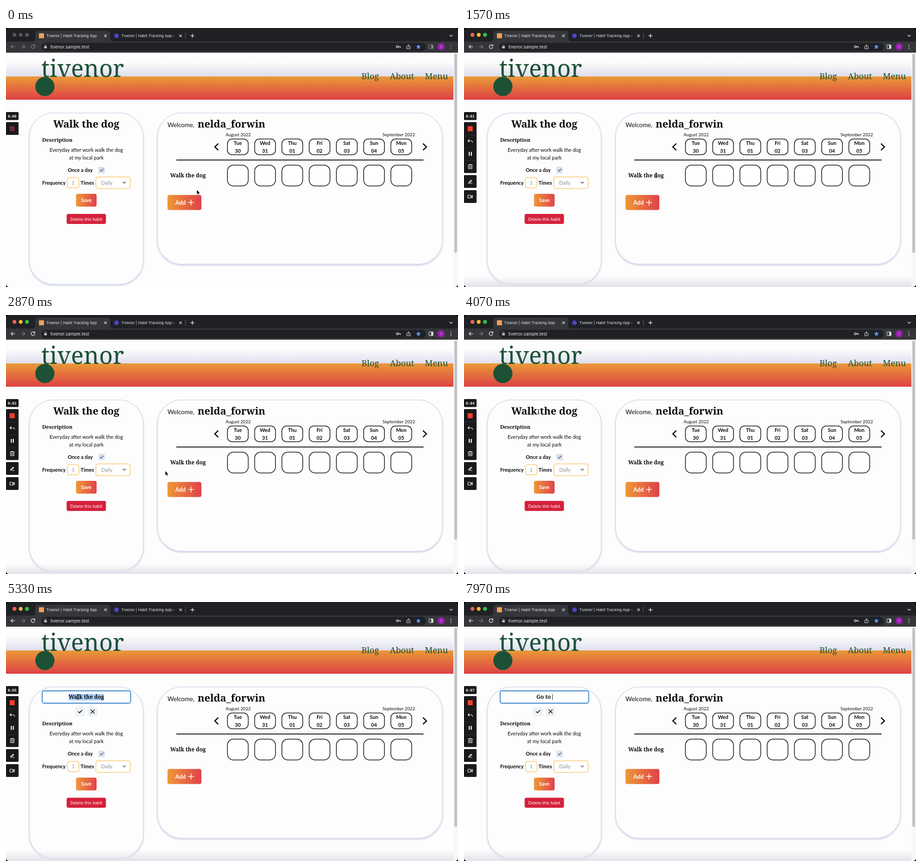
An HTML page for the animation above (8 s loop, 988 by 567 pixels).

```html
<!DOCTYPE html>
<html lang="en">
<head>
<meta charset="utf-8">
<title>Habit tracker</title>
<style>
html, body { margin: 0; width: 100%; height: 100%; overflow: hidden; background: #000; }
svg { display: block; width: 100vw; height: 100vh; }
text { font-family: Lato, sans-serif; font-size: 11px; fill: #0b0b0d; white-space: pre; }
.ui { font-family: Inter, sans-serif; font-size: 8.2px; fill: #e8eaed; }
.serif { font-family: "Noto Serif", serif; }
.b { font-weight: 700; }
.mid { text-anchor: middle; }
.h1 { font-size: 22px; }
.h2 { font-size: 11.8px; }
.h3 { font-size: 11.2px; }
.nav { font-size: 18.4px; fill: #1d5136; }
.small { font-size: 9.7px; }
.white { fill: #fff; }
.gray { fill: #8b8d92; }
.line { fill: none; stroke-linecap: round; stroke-linejoin: round; }
</style>
</head>
<body>
<svg id="stage" viewBox="0 0 988 567" preserveAspectRatio="none"></svg>
<script>
const text = (x, y, s, cls = '', extra = '') =>
  `<text x="${x}" y="${y}" class="${cls}" ${extra}>${s}</text>`;
const rect = (x, y, w, h, r, fill, extra = '') =>
  `<rect x="${x}" y="${y}" width="${w}" height="${h}" rx="${r}" fill="${fill}" ${extra}/>`;
const line = (d, color, w = 1.2, extra = '') =>
  `<path class="line" d="${d}" stroke="${color}" stroke-width="${w}" ${extra}/>`;
const circle = (x, y, r, fill, extra = '') =>
  `<circle cx="${x}" cy="${y}" r="${r}" fill="${fill}" ${extra}/>`;
const gradient = (id, from, to, dir) =>
  `<linearGradient id="${id}" ${dir}><stop stop-color="${from}"/><stop offset="1" stop-color="${to}"/></linearGradient>`;
const down = 'x1="0" y1="0" x2="0" y2="1"';
const cross = (x, y, r) => `M${x - r} ${y - r}l${2 * r} ${2 * r}m0 ${-2 * r}l${-2 * r} ${2 * r}`;
const plus = (x, y, r) => `M${x - r} ${y}h${2 * r}M${x} ${y - r}v${2 * r}`;

const defs = `<defs>
  ${gradient('warm', '#ea9a38', '#dd4145', down)}
  ${gradient('button', '#ee9838', '#e0424a', '')}
  ${gradient('haze', '#fdfdfd', '#dfdfee', down)}
  ${gradient('shade', '#e4e4ea00', '#e2e2e9', down)}
  <filter id="soft" x="-5%" y="-5%" width="110%" height="112%">
    <feDropShadow dx="0" dy="2" stdDeviation="1.5" flood-color="#b9c2dc" flood-opacity=".7"/>
  </filter>
  <clipPath id="window"><rect width="988" height="567" rx="7"/></clipPath>
  <clipPath id="tools"><rect id="toolsBox" y="206" width="28" height="28"/></clipPath>
</defs>`;

function browser() {
  const ink = '#dfe1e5', dim = '#85878b';
  const lights = ['#ff5f57', '#febc2e', '#28c840'];
  const name = 'Tivenor | Habit Tracking App';
  return rect(0, 0, 988, 31, 0, '#202124') +
    `<path d="M56 30q8 0 8-8v-9q0-7 7-7h150q7 0 7 7v9q0 8 8 8z" fill="#35363a"/>` +
    rect(0, 29.5, 988, 24.5, 0, '#35363a') +
    rect(77, 32.5, 841, 18, 9, '#202124') +
    lights.map((c, i) => circle(18.5 + i * 13.7, 15, 4.2, '#55565a') +
      circle(18.5 + i * 13.7, 15, 4.2, c, 'class="active"')).join('') +
    rect(72, 11.5, 11, 11, 1, '#f0a05a') + text(88, 20, name, 'ui') +
    circle(241.5, 17, 5, '#4b46c9') + text(252, 20, name + ' -', 'ui') +
    line(cross(217.5, 17, 2.4) + cross(381.5, 17, 2.4), ink) +
    line('M392 11v12', '#5f6368', 1) + line(plus(407.5, 17, 3.8), ink, 1.4) +
    line('M970 15.5l3 3 3-3', ink) +
    line('M41 41h-8m4.500-3.700l3.700 3.700-3.700 3.700', dim) +
    [dim, ink].map((c, i) => `<g ${i ? 'class="active"' : ''}>` +
      line('M19.500 41h-8.500m3.700-3.700l-3.700 3.700 3.700 3.700M62.500 38.500a4 4 0 1 0 .5 3.500M63 36.500v2.700h-2.700', c) +
      rect(924.5, 37, 9, 8, 1, 'none', `stroke="${c}"`) + rect(929.5, 37, 4, 8, 0, c) +
      [37, 41, 45].map(y => circle(972.5, y, 1, c)).join('') + '</g>').join('') +
    rect(83.3, 40, 6, 4.6, .7, '#bdc1c6') + line('M84.700 40v-1.500a1.600 1.600 0 0 1 3.200 0v1.500', '#bdc1c6', 1) +
    text(97, 44.5, 'tivenor.sample.test', 'ui', 'style="font-size:9.5px"') +
    circle(855.5, 41, 2.2, 'none', `stroke="${ink}" stroke-width="1.3"`) + line('M858 41h4v2', ink, 1.4) +
    line('M877.500 40h-1.500v5.500h7.500v-5.500h-1.500M879.750 43v-6.500m-2 2l2-2 2 2', ink, 1) +
    `<path d="M901.500 36l1.500 3.300 3.700.4-2.800 2.500.8 3.700-3.200-1.900-3.200 1.900.8-3.700-2.800-2.500 3.700-.4z" fill="#5b9bff"/>` +
    circle(951, 41, 7.7, '#9a1fb3') + text(951, 44, 'I', 'ui mid');
}

function header() {
  return rect(0, 54, 988, 513, 0, '#fdfdfd') +
    rect(0, 74, 978, 32, 0, 'url(#haze)') +
    rect(0, 106, 978, 51, 0, 'url(#warm)') +
    rect(978, 54, 10, 513, 0, '#f7f7f8') + rect(980, 56, 6, 436, 3, '#c2c2c4') +
    circle(85, 128, 21, '#1d5136') +
    text(77, 107, 'tivenor', 'serif nav', 'style="font-size:52px"') +
    text(777, 111.5, 'Blog', 'serif nav') + text(839, 111.5, 'About', 'serif nav') +
    text(915.5, 111.5, 'Menu', 'serif nav');
}

const panel = (x, w, h) =>
  rect(x, 186, w, h, 53, '#fdfdfd', 'stroke="#dde2f1" stroke-width="2" filter="url(#soft)"');

function habitForm() {
  const field = (x, y, w, h) => rect(x, y, w, h, 4.5, '#fff', 'stroke="#fbd592" stroke-width="2"');
  return panel(51, 249, 375) +
    `<g id="heading">${text(175.5, 218, 'Walk the dog', 'serif b h1 mid')}</g>
    <g id="editor">` +
      rect(79, 194.5, 193.5, 27, 4, '#fff', 'stroke="#2f7fc6" stroke-width="1.8"') +
      `<rect id="selection" y="201" height="14.500" fill="#a9cdf5"/>` +
      text(175.5, 212, '', 'serif b h2 mid', 'id="entry"') +
      `<rect id="caret" y="201.500" width="1" height="13" fill="#111"/>` +
      rect(151, 229, 21.5, 21.5, 4, '#edf2f7') + rect(178.5, 229, 21.5, 21.5, 4, '#edf2f7') +
      line('M158 240l2.700 2.700 5.300-5.700', '#111', 1.7) + line(cross(189.2, 239.7, 4), '#111', 1.5) +
    `</g><g id="details">` +
      text(79, 249, 'Description', 'serif b h3') +
      text(175.5, 271, 'Everyday after work walk the dog', 'mid') +
      text(175.5, 287.5, 'at my local park', 'mid') +
      text(135, 315, 'Once a day', 'b') +
      rect(202, 304, 14, 14, 2, '#d8e2ef') + line('M206 311.300l2.200 2.200 4.300-5', '#48566a', 1.3) +
      text(79, 342.5, 'Frequency', 'b') + text(163, 342.5, 'Times', 'b') +
      field(134.5, 327.5, 25, 22.5) + text(147, 342.5, '1', 'gray mid') +
      field(196.5, 326, 75, 25.5) + text(208, 342.5, 'Daily', 'gray') +
      line('M255.500 337l3 3 3-3', '#45484e', 1.3) +
      rect(153, 363, 45, 28, 4, 'url(#button)') + text(175.5, 381, 'Save', 'b white mid') +
      rect(132.5, 407, 86, 22, 4, '#d5213b') + text(175.5, 421.5, 'Delete this habit', 'small white mid') +
    `</g><g id="tip">` +
      rect(145, 237, 61, 17.5, 2, '#2d3543') + text(175.5, 249, 'Click to edit', 'small white mid') + '</g>';
}

function calendar() {
  const days = ['Tue 30', 'Wed 31', 'Thu 01', 'Fri 02', 'Sat 03', 'Sun 04', 'Mon 05'];
  const box = 'stroke="#111216" stroke-width="1.5"';
  return panel(331, 623, 331) +
    text(353, 217, 'Welcome,', '', 'style="font-size:13.500px"') + text(419, 218, 'nelda_forwin', 'serif b h1') +
    text(480, 237, 'August 2022', 'small') + text(894, 237, 'September 2022', 'small', 'text-anchor="end"') +
    line('M464 253l-7.500 7.300 7.500 7.300M911.500 253l7.500 7.300-7.500 7.300', '#111', 2.6, 'style="stroke-linecap:butt;stroke-linejoin:miter"') +
    days.map((day, i) => {
      const x = 484 + i * 59.55, [name, date] = day.split(' ');
      return rect(x, 243, 45.5, 34.5, 10, '#fff', box) + rect(x, 300.3, 45.5, 45.5, 13, '#fff', box) +
        text(x + 22.7, 256, name, 'b mid') + text(x + 22.7, 272.5, date, 'b mid');
    }).join('') +
    line('M373 289h539', '#1b1c20', 2) +
    text(359, 327, 'Walk the dog', 'serif b h2') +
    rect(353, 365.5, 74, 33, 4, 'url(#button)') +
    text(370, 386.5, 'Add', 'b white', 'style="font-size:12.500px"') +
    line(plus(404.5, 382, 5.6), '#fff', 1.7);
}

function recorder() {
  const bg = '#1a1a1c', ink = '#fff';
  return rect(0, 184, 27.5, 17.5, 2, bg) +
    text(13.5, 195.6, '', 'b white mid', 'id="clock" style="font:bold 7.800px \'DejaVu Sans Mono\',monospace"') +
    `<g clip-path="url(#tools)">` +
      rect(0, 206, 27.5, 111.5, 2, bg) +
      line('M0 234.300h27.500m-27.500 28h27.500m-27.500 28h27.500', '#38383b', .7) +
      rect(8, 215, 11, 11, 1, '#6d2440') + rect(8, 215, 11, 11, 1, '#f2402b', 'class="active"') +
      line('M11.500 244.500l-2.800 2.500 2.800 2.500M9 247h6q3.500 0 3.800 3.500', ink) +
      line('M11.500 272v7m4.500-7v7', ink, 2.2) +
      line('M9 300h9.500M12 300v-1.500h3.500v1.500M10 300.500v7.500h7.500v-7.500M12.500 302.500v3.500m2.500-3.500v3.500', ink, 1.1) +
    `</g><g class="active">` +
      rect(0, 322, 27.5, 28, 2, bg) + rect(0, 355, 27.5, 28, 2, bg) +
      line('M10 338.500l5.500-5.500 1.500 1.500-5.500 5.500h-1.500z', ink, 1.2) + line('M14 340.500h4', ink, 1) +
      rect(8.5, 366, 6.5, 6.5, 1, 'none', 'stroke="#fff" stroke-width="1.2"') +
      line('M15 369l3.500-2.500v5.500l-3.500-2.500', ink, 1.1) + '</g>';
}

const pointer = `<g id="pointer">
  <path id="arrow" d="M0 0v10.500l2.500-2.200 1.700 3.700 1.600-.7-1.600-3.500h3.300z" fill="#000" stroke="#fff" stroke-width=".7"/>
  <path id="beam" class="line" d="M-2-5q2 0 2 1.500v7q0 1.500-2 1.500M2-5q-2 0-2 1.500v7q0 1.500 2 1.500M-1 1h2" stroke="#111" stroke-width="1"/>
</g>`;

const $ = id => document.getElementById(id);
$('stage').innerHTML = defs + '<g clip-path="url(#window)">' + browser() + header() + habitForm() +
  calendar() + rect(0, 543, 978, 24, 0, 'url(#shade)', 'id="floor"') + recorder() + pointer + '</g>';
const actives = document.querySelectorAll('.active');

const ramp = (t, a, b) => Math.min(1, Math.max(0, (t - a) / (b - a)));
const ease = p => p * p * (3 - 2 * p);
const show = (id, on) => $(id).setAttribute('opacity', +on);

// time, x, y
const route = [[30, 417, 354], [480, 420, 323], [2150, 420, 323], [2800, 348, 341], [3400, 348, 341], [4150, 157, 208]];
const typing = [[6670, 'G'], [7000, 'Go'], [7300, 'Go\u00a0'], [7700, 'Go t'], [7830, 'Go to'], [7950, 'Go to\u00a0']];
const editAt = 5300, typeAt = typing[0][0];

function pointerAt(t) {
  let [, x, y] = route[0];
  for (let i = 1; i < route.length; i++) {
    const [a, x0, y0] = route[i - 1], [b, x1, y1] = route[i];
    if (t < a) break;
    const p = ease(ramp(t, a, b));
    x = x0 + (x1 - x0) * p;
    y = y0 + (y1 - y0) * p;
  }
  return [x, y];
}

function draw(t) {
  const wake = ramp(t, 30, 430);
  actives.forEach(el => el.setAttribute('opacity', wake));
  $('toolsBox').setAttribute('height', 28 + 84 * ease(ramp(t, 80, 500)));
  $('clock').textContent = '0:0' + Math.max(0, Math.floor((t - 70) / 1000));
  show('floor', ramp(t, 770, 1570));

  const [x, y] = pointerAt(t);
  const overText = (t > 380 && t < 2350) || t > 4050;
  $('pointer').setAttribute('transform', `translate(${x} ${y})`);
  show('pointer', t < typeAt);
  show('arrow', !overText);
  show('beam', overText);

  const editing = t >= editAt, typed = t >= typeAt;
  show('heading', !editing);
  show('editor', editing);
  show('tip', editing ? 0 : ramp(t, 4200, 4350));
  $('details').setAttribute('transform', `translate(0 ${editing ? 21.4 : 0})`);

  const step = typing.filter(([at]) => t >= at).pop();
  $('entry').textContent = step ? step[1] : 'Walk the dog';
  const width = $('entry').getComputedTextLength();
  $('selection').setAttribute('x', 175.5 - width / 2);
  $('selection').setAttribute('width', width);
  show('selection', editing && !typed);
  $('caret').setAttribute('x', 175.5 + width / 2);
  show('caret', typed);
}

function tick() {
  draw(performance.now() % 8000);
  requestAnimationFrame(tick);
}
tick();
</script>
</body>
</html>
```
